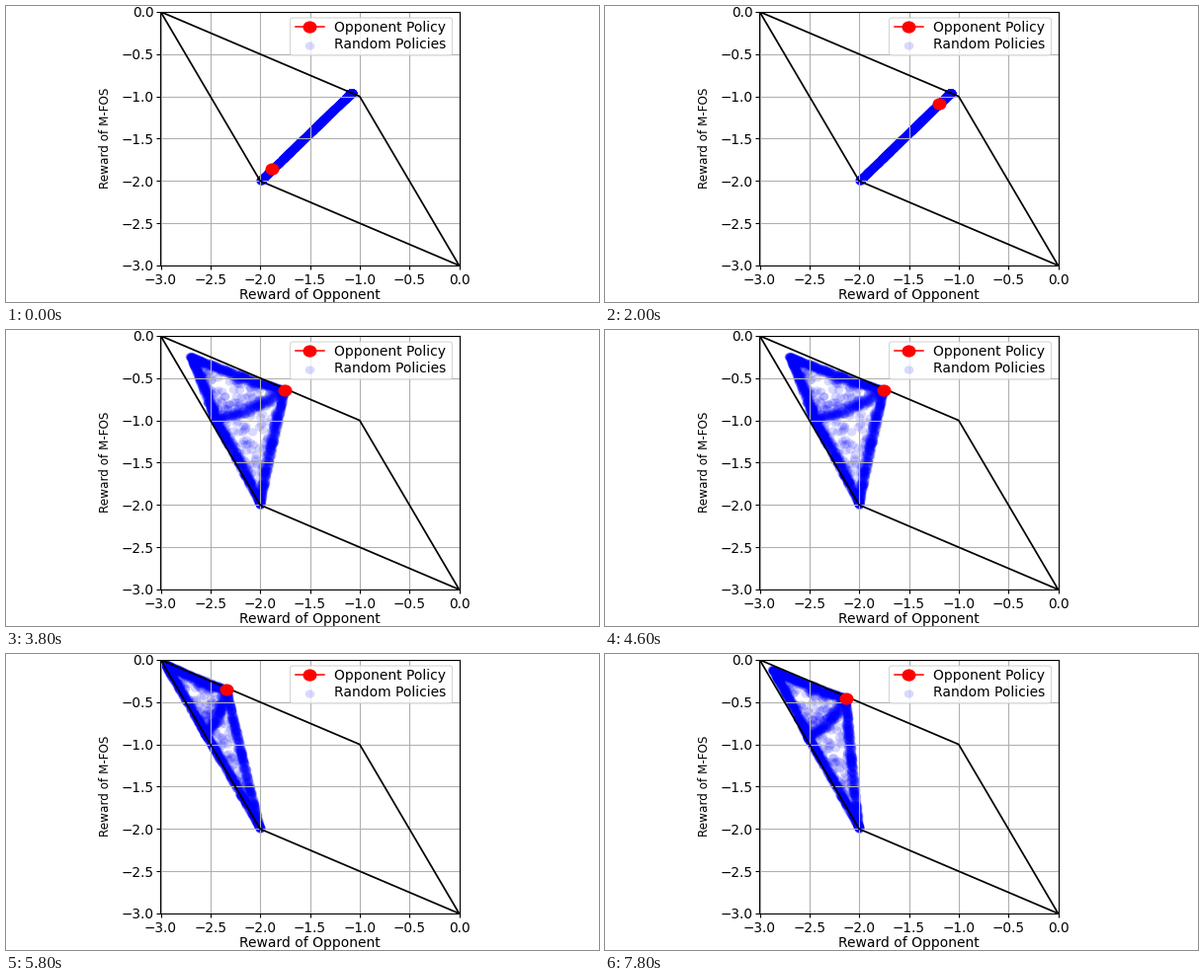
Recreate the animation shown at these times as a matplotlib script. Size 600x300 px, loop 8 s.

```python
import numpy as np
import matplotlib.pyplot as plt
from matplotlib.animation import FuncAnimation
from matplotlib.patches import FancyBboxPatch
from matplotlib.path import Path

W, H, DPI = 600, 300, 100
FRAMES, STEP = 40, 200
PT = 72 / DPI

# Corners of the reward region
DEFECT = np.array([-2.0, -2.0])
COOPERATE = np.array([-1.0, -1.0])
EXPLOIT = np.array([-3.0, 0.0])
LINE_END = np.array([-1.08, -0.955])

LEARN_1, RESTART, LEARN_2 = 12, 24, 29   # first frame of each phase
BEND = 0.43                              # where the inner band meets the left side


def lerp(a, b, t):
    return (1 - t) * a + t * b


def learned(x):
    """Left and right corners once the opponent's reward has reached x."""
    left = np.array([-2.71 + 0.45 * (x + 1.76), -0.235 - 0.34 * (x + 1.76)])
    right = np.array([x, -(x + 3) / 2 - 0.015])
    return left, right


def state(i):
    """Left corner, right corner and opponent policy at frame i."""
    if i < LEARN_1:
        return LINE_END, LINE_END, lerp(DEFECT, LINE_END, 0.133 + 0.0745 * i)
    if i < LEARN_2 and i >= RESTART:
        t = (i - RESTART) / (LEARN_2 - RESTART - 1)
        return EXPLOIT, COOPERATE, lerp(DEFECT, COOPERATE, t)
    if i < RESTART:
        x = -1.75 - 0.46 * np.exp(-1.5 * (i - LEARN_1))
    else:
        x = -2.07 - 0.265 * np.exp(-0.15 * (i - LEARN_2))
    left, right = learned(x)
    return left, right, right


def corners(left, right):
    """The left side bows out towards the edge of the reward region."""
    pull = 0.6 * min(1, np.hypot(*(right - left)))
    mid = lerp(left, DEFECT, BEND)
    edge_x = -3 - mid[1] / 2
    mid = np.array([lerp(mid[0], edge_x, pull), mid[1]])
    return np.array([left, right, DEFECT, mid])


def sample_weights():
    """Weights of each random policy on (left, right, low, mid)."""
    rng = np.random.default_rng(4)
    left, right, low, mid = np.eye(4)
    parts = []

    def band(a, b, c, n, spread, sag=0.0):
        t = rng.beta(0.85, 0.85, (n, 1))
        arch = t * (1 - t)
        u = np.abs(rng.normal(0, spread, (n, 1))) * np.sqrt(arch) + 4 * sag * arch
        parts.append(lerp(lerp(a, b, t), c, u))

    band(left, mid, right, 300, 0.07)
    band(mid, low, right, 380, 0.07)
    band(left, right, mid, 400, 0.10)
    band(right, low, mid, 360, 0.09)
    band(mid, right, low, 110, 0.06, 0.02)
    band(mid, right, left, 60, 0.06, -0.02)
    for tri in ((left, mid, right), (mid, right, low)):
        parts.append(rng.dirichlet([0.95] * 3, 95) @ np.array(tri))
    return np.vstack(parts)


weights = sample_weights()

fig = plt.figure(figsize=(W / DPI, H / DPI), dpi=DPI, facecolor="white")
ax = fig.add_axes([156.5 / W, 1 - 263 / H, 302 / W, 257.1 / H])
ax.set(xlim=(-3, 0), ylim=(-3, 0))
ticks = np.arange(-3, 0.1, 0.5)
ax.set_xticks(ticks)
ax.set_yticks(ticks)
ax.tick_params(labelsize=9.8, length=3, pad=2)
ax.tick_params(axis="x", pad=3)
ax.grid(True, lw=0.8, color="#b0b0b0")

circle = Path.unit_circle()
oval = Path(circle.vertices * [1, 0.87], circle.codes)
blue_style = dict(s=(9.6 * PT) ** 2, marker=oval, color="blue",
                  alpha=0.15, linewidths=0)
red_style = dict(color="red", marker=oval, ms=14 * PT, mew=0)

cloud = ax.scatter(np.zeros(len(weights)), np.zeros(len(weights)), **blue_style)
ax.plot([-3, -1, 0, -2, -3], [0, -1, -3, -2, 0], color="black", lw=1.25)
policy, = ax.plot([], [], **red_style)

fig.text(307 / W, 1 - 293.3 / H, "Reward of Opponent", size=10,
         ha="center", va="center")
fig.text(100.5 / W, 1 - 134 / H, "Reward of M-FOS", size=8.65, rotation=90,
         ha="center", va="center")

# Legend in pixel coordinates
key = fig.add_axes([0, 0, 1, 1], zorder=2)
key.set(xlim=(0, W), ylim=(H, 0))
key.axis("off")
key.add_patch(FancyBboxPatch((290, 14.5), 159, 33,
                             boxstyle="round,pad=2.5,rounding_size=2.5",
                             fc="white", ec="#cccccc", lw=0.8, alpha=0.8))
key.plot([292.5, 322], [21.3, 21.3], color="red", lw=1.1)
key.plot([307], [21.3], **red_style)
key.scatter([307], [39.7], **blue_style)
for y, label in ((26, "Opponent Policy"), (43.3, "Random Policies")):
    key.text(332, y, label, size=10, va="baseline")


def draw(i):
    left, right, red = state(i)
    cloud.set_offsets(weights @ corners(left, right))
    policy.set_data([red[0]], [red[1]])
    return cloud, policy


anim = FuncAnimation(fig, draw, frames=FRAMES, interval=STEP, repeat=True,
                     repeat_delay=0, init_func=lambda: draw(0))
plt.show()
```
